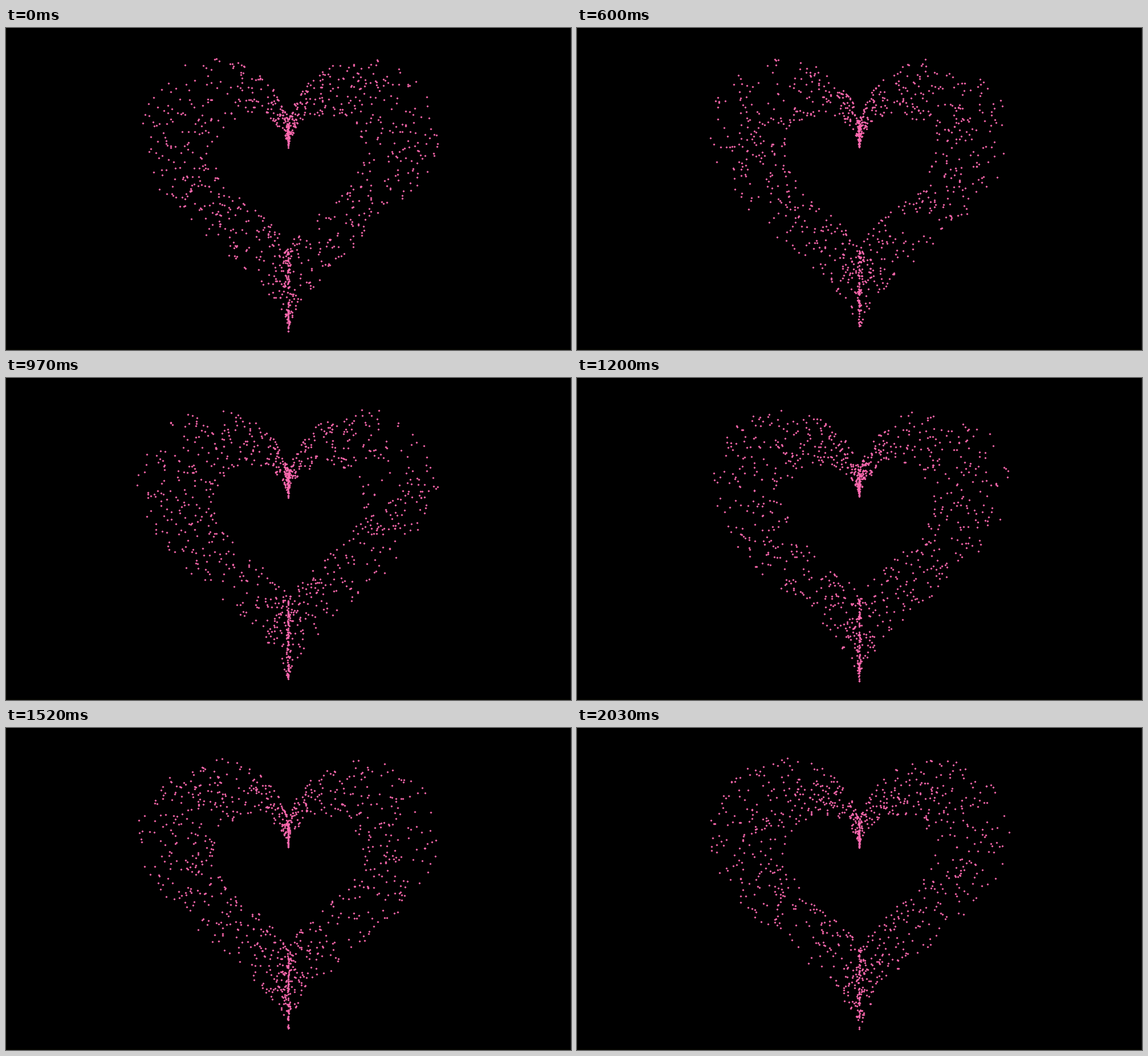
Recreate the animation shown at these times as an HTML page with a canvas. Size 991 by 565 pixels, loop 2.08 s.

```html
<!DOCTYPE html>
<html lang="en">
<head>
<meta charset="utf-8">
<title>Sparkling heart</title>
<style>
  html, body { margin: 0; width: 100%; height: 100%; overflow: hidden; background: #000; }
  canvas { display: block; }
  body::after {
    content: ""; position: fixed; left: 0; top: 0; width: 991px; height: 565px;
    box-sizing: border-box; border: solid #0c0c04; border-width: 0 1px 1px;
    border-right-color: #1c1c1c;
  }
</style>
</head>
<body>
<canvas id="stage" width="991" height="565"></canvas>
<script>
const ctx = document.getElementById("stage").getContext("2d");
const LOOP = 2080, STEPS = 45, DOTS = 1000;
const CX = 495, CY = 251, INNER = 8.2, SPREAD = 8.4;

// Steps last 40 or 50 ms, on a 10 ms clock.
const stepStart = k => 10 * Math.floor(4.61 * k + 0.6);

function seeded(seed) {
  return () => {
    seed = (seed + 0x6D2B79F5) | 0;
    let n = Math.imul(seed ^ (seed >>> 15), 1 | seed);
    n = (n + Math.imul(n ^ (n >>> 7), 61 | n)) ^ n;
    return ((n ^ (n >>> 14)) >>> 0) / 4294967296;
  };
}

function heartPoint(t, scale) {
  const x = 16 * Math.sin(t) ** 3;
  const y = 13 * Math.cos(t) - 5 * Math.cos(2 * t) - 2 * Math.cos(3 * t) - Math.cos(4 * t);
  return [Math.round(CX + x * scale), Math.round(CY - y * scale)];
}

// A small diamond centred on one pixel.
function drawDot(x, y) {
  const cx = x + 0.5, cy = y + 0.5, r = 2;
  ctx.beginPath();
  ctx.moveTo(cx - r, cy);
  ctx.lineTo(cx, cy - r);
  ctx.lineTo(cx + r, cy);
  ctx.lineTo(cx, cy + r);
  ctx.fill();
}

function draw(step) {
  const random = seeded(step * 7919 + 17);
  ctx.fillStyle = "#000";
  ctx.fillRect(0, 0, 991, 565);
  ctx.fillStyle = "#fd68ae";
  for (let i = 0; i < DOTS; i++) {
    drawDot(...heartPoint(random() * 2 * Math.PI, INNER + SPREAD * random()));
  }
}

let shown = -1;
function tick() {
  const time = performance.now() % LOOP;
  let step = 0;
  while (step < STEPS - 1 && stepStart(step + 1) <= time) step++;
  if (step !== shown) draw(shown = step);
  requestAnimationFrame(tick);
}
tick();
</script>
</body>
</html>
```
